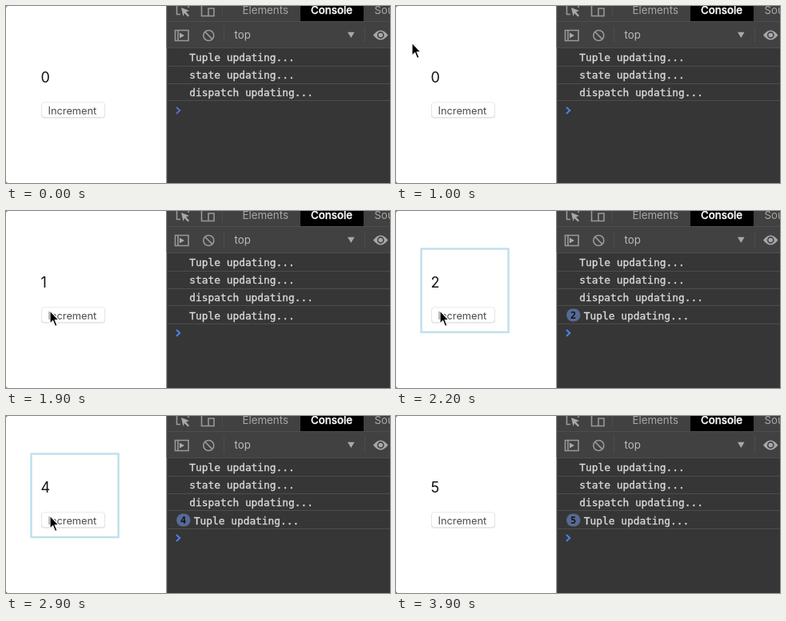
These frames come from a looping animation (480x222 px, 4000 ms). An HTML page:

```html
<!DOCTYPE html>
<html lang="en">
<head>
<meta charset="utf-8">
<title>Counter and console</title>
<style>
  html, body { margin: 0; width: 100%; height: 100%; overflow: hidden; background: #fff; }
  svg { display: block; }
  text { font: 13.3px Inter, "Liberation Sans", sans-serif; white-space: pre; }
  .mono text { font: 12.85px "DejaVu Sans Mono", monospace; fill: #dadada; stroke: #dadada; stroke-width: .35; }
  .mono #repeat { font-size: 12px; font-weight: bold; fill: #151515; stroke: none; }
  .rule { stroke: #4d4d4d; }
  .icon { fill: none; stroke: #989898; stroke-width: 1.6; }
</style>
</head>
<body>
<svg width="480" height="222" viewBox="0 0 480 222">
  <defs>
    <linearGradient id="blue" x2="0" y2="1">
      <stop stop-color="#6da3fb"/><stop offset="1" stop-color="#3f78f3"/>
    </linearGradient>
  </defs>
  <rect width="201" height="222" fill="#fff"/>
  <path d="M0 0h2L0 2zM0 222h2l-2-2z" fill="#888"/>

  <!-- Page -->
  <rect id="outline" x="31.5" y="47.5" width="109" height="104.5" fill="none" stroke="#bce0ed" stroke-width="2.4"/>
  <text id="count" x="43.5" y="96" style="font-size:18px" fill="#111"></text>
  <rect x="44" y="121.3" width="80" height="19.2" rx="4" fill="#d0d0d0"/>
  <rect id="button" x="44.5" y="120.8" width="79" height="19" rx="3.6" stroke-width=".8"/>
  <text id="label" x="52.5" y="135.5" style="font-size:12.8px">Increment</text>

  <!-- Developer tools -->
  <rect x="200.7" width="280" height="222" fill="#363636"/>
  <rect x="200.7" width="280" height="52" fill="#414141"/>
  <rect x="200.7" width="1.3" height="222" fill="#4a4a4a"/>
  <rect x="368" width="79" height="19.5" fill="#000"/>
  <path class="rule" d="M201 19.5H480M201 52.5H480M270.5 0V14M272.5 26V46M448.5 26V46"/>
  <g fill="#a8a8a8">
    <text x="295.5" y="9.5">Elements</text>
    <text x="381" y="9.5" fill="#fff" stroke="#fff" stroke-width=".3" style="font-weight:500">Console</text>
    <text x="460.5" y="9.5">Sources</text>
    <text x="285.5" y="41" fill="#bbb">top</text>
    <path d="M427 32.8h8.6l-4.3 7.2zM217 33.5l6 3.5-6 3.5zM219 2l10 4-4 1.5 4 4.5-1.5 1.5-4.5-4.5-1.5 4z"/>
    <path d="M459 36.5Q468.3 24.5 477.5 36.5Q468.3 48.5 459 36.5z"/>
    <circle cx="468.3" cy="36.5" r="3.6" stroke="#414141" stroke-width="1.6"/>
  </g>
  <g class="icon">
    <path d="M213.5 0V10.5H218M228 0V2M244.5 0V12.5H260V3H253V12M211.5 30.5H228V43.5H211.5zM215 30.5V43.5"/>
    <circle cx="253.3" cy="37" r="6.5"/>
    <path d="M248.7 32.4l9.2 9.2"/>
  </g>

  <!-- Log -->
  <g class="mono">
    <path class="rule" d="M201 75.5H480M201 97.5H480M201 118.5H480"/>
    <text x="229.3" y="69">Tuple updating...</text>
    <text x="229.3" y="91">state updating...</text>
    <text x="229.3" y="113">dispatch updating...</text>
    <g id="entry">
      <path class="rule" d="M201 141.5H480"/>
      <text id="message" y="135.5">Tuple updating...</text>
      <g id="badge">
        <rect x="213" y="122.5" width="17.5" height="16" rx="8" fill="#566a94"/>
        <text id="repeat" x="221.7" y="135" text-anchor="middle"></text>
      </g>
    </g>
    <path id="prompt" d="M213 127l4.3 4-4.3 4" fill="none" stroke-width="1.9"/>
  </g>

  <!-- Pointer -->
  <circle id="ring" cx="55" cy="127" r="25.2" fill="none" stroke="#111" stroke-width="1.7"/>
  <path id="cursor" d="M0 0V16.2L3.7 12.8L6.5 19.6L9 18.5L6.2 11.8H11z" fill="#000" stroke="#fff" stroke-width="1.1"/>
</svg>
<script>
const LOOP = 4000, STEP = 100, PRESS = 100, FLASH = 300;
const clicks = [1600, 2100, 2500, 2800, 3100];
const path = [
  [800, 13, 43], [1000, 20, 46], [1100, 28, 61], [1200, 42, 90], [1300, 52, 112],
  [1400, 55, 125], [3500, 55, 125], [3600, 80, 138], [3800, 183, 203], [3900, 240, 240]
];
const $ = id => document.getElementById(id);
const show = (id, on) => $(id).setAttribute("visibility", on ? "inherit" : "hidden");
const set = (id, attrs) => {
  for (const key in attrs) $(id).setAttribute(key, attrs[key]);
};

function pointer(t) {
  const i = path.findIndex(p => p[0] > t);
  if (i < 1) return null;
  const [t0, x0, y0] = path[i - 1], [t1, x1, y1] = path[i];
  const k = (t - t0) / (t1 - t0);
  return [x0 + (x1 - x0) * k, y0 + (y1 - y0) * k];
}

function draw(t) {
  const count = clicks.filter(c => t >= c).length;
  const pressed = clicks.some(c => t >= c - PRESS && t < c);
  const pos = pointer(t);

  $("count").textContent = $("repeat").textContent = count;
  show("outline", clicks.some(c => t >= c && t < c + FLASH));
  show("ring", pressed);
  set("button", { fill: pressed ? "url(#blue)" : "#fff", stroke: pressed ? "#4a80ee" : "#e4e4e4" });
  set("label", { fill: pressed ? "#1d3f85" : "#4c4c4c" });

  show("entry", count > 0);
  show("badge", count > 1);
  set("message", { x: count > 1 ? 234.8 : 229.3 });
  set("prompt", {
    transform: `translate(0 ${count ? 22 : 0})`,
    stroke: t < 500 ? "#5275c4" : "#4a86ea"
  });

  show("cursor", pos);
  if (pos) set("cursor", { transform: `translate(${pos})` });
}

function frame(now) {
  draw(Math.floor(now % LOOP / STEP) * STEP);
  requestAnimationFrame(frame);
}
draw(0);
requestAnimationFrame(frame);
</script>
</body>
</html>
```
